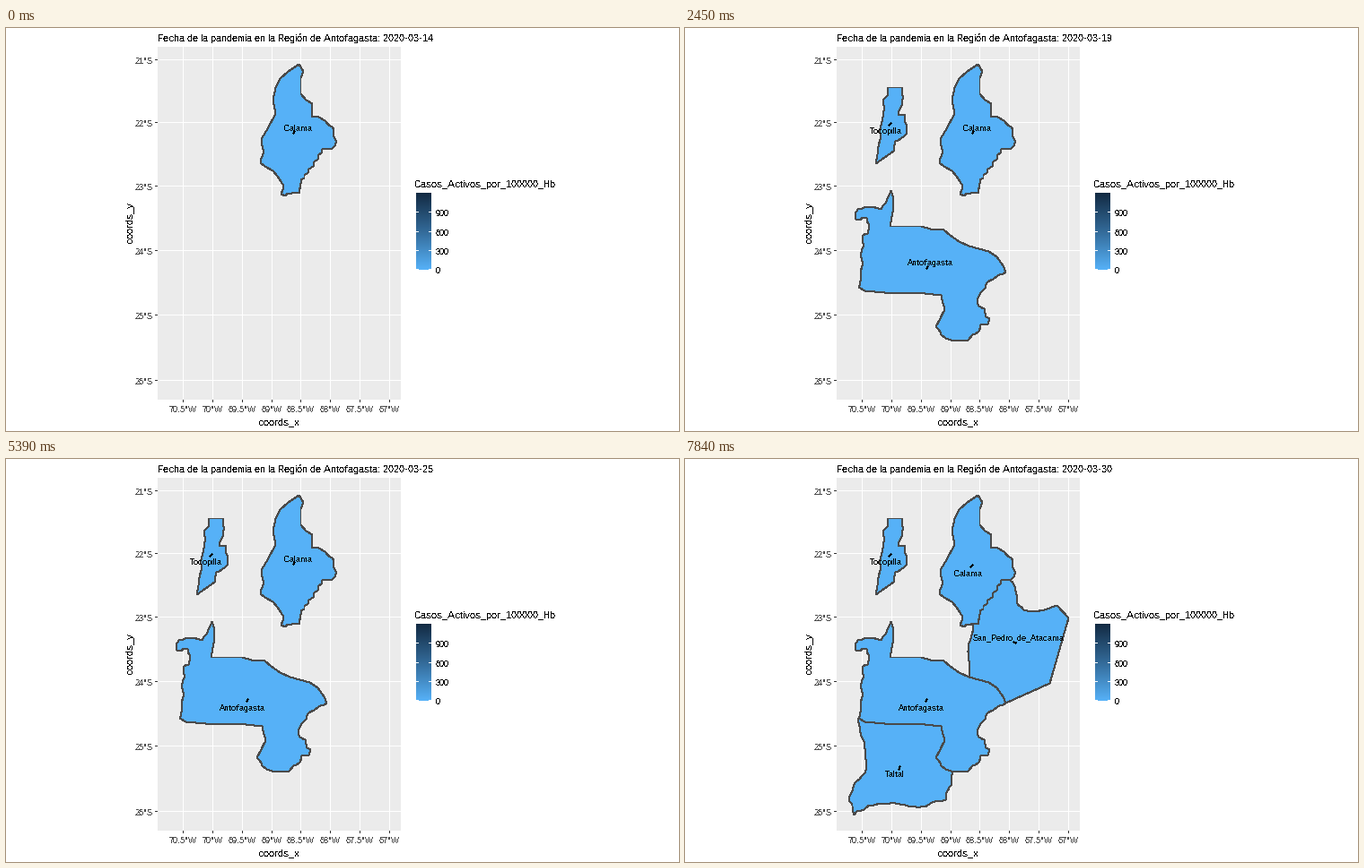
These frames come from a looping animation (750x450 px, 8 s). A matplotlib script:

```python
import math

import matplotlib.pyplot as plt
import numpy as np
from matplotlib.animation import FuncAnimation
from matplotlib.lines import Line2D
from matplotlib.patches import Polygon, Rectangle

W, H, DPI = 750, 450, 100
LOOP, INTERVAL, DAY_MS = 8000, 20, 490
PX = 72 / DPI

# Crisp, hinted, non-antialiased lettering
plt.rcParams.update({
    "font.family": "Liberation Sans",
    "text.hinting": "no_autohint",
    "text.hinting_factor": 1,
    "text.kerning_factor": 6,
    "text.antialiased": False,
})

FILL, EDGE = "#56B1F7", "#4A4A4A"
PANEL, TICK, GREY = "#EBEBEB", "#333333", "#4D4D4D"
LEFT, TOP, RIGHT, BOTTOM = 169, 21, 440, 415

fig = plt.figure(figsize=(W / DPI, H / DPI), dpi=DPI, facecolor="white")
ax = fig.add_axes([0, 0, 1, 1])
ax.axis("off")


def rect(x, y, w, h, color):
    ax.add_patch(Rectangle((x, y), w, h, fc=color, ec="none", lw=0, aa=False))


def text(x, y, s, px, color="black", ha="left", **kw):
    # Round the point size up so that the pixel size is a whole number
    size = math.ceil(px * PX * 64) / 64
    return ax.text(x, y, s, fontsize=size, color=color, ha=ha, va="baseline", **kw)


def rough(points, seed, step=4, amp=0.9):
    """Break a coastline into short, slightly ragged pieces."""
    rng = np.random.default_rng(seed)
    out = [points[0]]
    for (x0, y0), (x1, y1) in zip(points, points[1:]):
        n = max(1, round(math.hypot(x1 - x0, y1 - y0) / step))
        for i in range(1, n):
            dx, dy = rng.uniform(-amp, amp, 2)
            out.append((x0 + (x1 - x0) * i / n + dx, y0 + (y1 - y0) * i / n + dy))
        out.append((x1, y1))
    return out


def region(points):
    patch = Polygon(np.array(points) + 0.5, closed=True, fc=FILL, ec=EDGE,
                    lw=PX, aa=False, joinstyle="round")
    return ax.add_patch(patch)


# Panel, grid and axes
rect(LEFT, TOP, RIGHT - LEFT, BOTTOM - TOP, PANEL)
for i in range(8):
    x = round(197 + i * 32.85)
    rect(x, TOP, 1, BOTTOM - TOP, "white")
    rect(x, BOTTOM, 1, 3, TICK)
    text(x + 0.5, 429, f"{70.5 - i / 2:g}°W", 9, GREY, "center")
for lat, y in zip(range(21, 27), (35, 105, 176, 248, 320, 393)):
    rect(LEFT, y, RIGHT - LEFT, 1, "white")
    rect(LEFT - 3, y, 3, 1, TICK)
    text(164, y + 5, f"{lat}°S", 9, GREY, "right")
text(304.5, 443, "coords_x", 11, ha="center")
text(141, 217.5, "coords_y", 11, ha="center", rotation=90, rotation_mode="anchor")

# Legend
text(456, 178, "Casos_Activos_por_100000_Hb", 11)
stops = np.array([(19, 43, 67), (51, 106, 152), (86, 177, 247)]) / 255
shade = np.linspace(0, 2, 86)
bar = np.stack([np.interp(shade, range(3), stops[:, c]) for c in range(3)], -1)
ax.imshow(bar[:, None, :], extent=(457, 474, 270, 184), aspect="auto",
          interpolation="nearest")
for value, y in zip((900, 600, 300, 0), (205, 227, 248, 269)):
    for x in (457, 471):
        rect(x, y, 3, 1, "white")
    text(479, y + 5, str(value), 9)

# Borders, some of them shared by neighbours
calama_west = [
    (306, 185), (308, 180), (309, 176), (306, 171), (302, 165), (297, 159),
    (288, 154), (283, 150), (284, 145), (287, 138), (284, 128), (285, 122),
    (291, 112), (300, 95), (297, 80), (300, 66), (305, 56), (314, 48),
    (326, 40), (331, 48), (328, 55), (328, 73), (334, 80), (341, 84),
    (340, 98), (348, 99), (355, 103)]
calama_east = rough([
    (355, 103), (363, 110), (365, 113), (365, 121), (367, 125), (366, 131),
    (362, 135)], 1)
calama_south = rough([
    (362, 135), (352, 135), (351, 139), (348, 141), (347, 146), (343, 149),
    (342, 154), (337, 157), (336, 161), (332, 164), (332, 167), (328, 169),
    (327, 183), (319, 183)], 2, amp=0.6)
calama_tip = [(317, 185), (313, 184), (311, 187)]

tocopilla_coast = rough([
    (212, 151), (214, 141), (215, 132), (217, 124), (217, 112), (219, 104),
    (221, 92), (221, 79), (225, 75), (226, 66)], 3, amp=0.6)
tocopilla_east = rough([
    (241, 66), (242, 75), (241, 86), (238, 92), (237, 96), (245, 97),
    (244, 104), (247, 108), (247, 117), (243, 121), (234, 126), (232, 137)],
    4, amp=0.5)

antofagasta_north = [
    (229, 181), (232, 190), (231, 205), (228, 221), (263, 221), (273, 224),
    (288, 225), (295, 231), (305, 238), (316, 243)]
puna = [(316, 243), (338, 249), (347, 255), (354, 265), (357, 272)]
antofagasta_east = rough([
    (357, 272), (350, 275), (343, 280), (336, 284), (334, 290), (329, 295),
    (325, 303), (327, 310), (333, 313), (335, 322), (339, 324), (337, 330),
    (329, 331), (327, 338), (320, 342), (314, 349), (298, 349)], 5)
taltal_east = rough([
    (298, 349), (290, 346), (285, 342), (282, 336), (279, 333), (284, 324),
    (289, 314)], 6, amp=0.5)
taltal_north = [
    (289, 314), (286, 303), (285, 298), (267, 296), (222, 295), (200, 293),
    (193, 289)]
antofagasta_coast = rough([
    (193, 289), (195, 282), (197, 265), (196, 250), (198, 240), (197, 232),
    (203, 229), (205, 220), (202, 212), (197, 211), (195, 214), (190, 213),
    (189, 207), (192, 202), (205, 199), (218, 202), (224, 193), (229, 181)], 7)

taltal_coast = rough([
    (193, 289), (194, 303), (200, 317), (200, 330), (202, 338), (200, 350),
    (194, 357), (188, 363), (186, 370), (183, 376), (182, 381), (186, 386),
    (188, 397), (191, 393), (199, 391), (205, 386), (218, 385), (234, 384),
    (245, 386), (260, 389), (267, 388), (278, 382), (290, 380), (291, 372),
    (297, 363), (296, 358), (298, 349)], 8)
pedro_west = rough([
    (319, 183), (321, 187), (318, 200), (315, 207), (316, 225), (317, 234),
    (316, 243)], 9, amp=0.5)
pedro_north = rough([
    (362, 135), (366, 140), (369, 151), (369, 160), (377, 168), (389, 170)],
    10, amp=0.6)
pedro_east = [(400, 168), (414, 163), (427, 177), (406, 250), (357, 272)]

shapes = {
    "Calama": calama_west + calama_east + calama_south + calama_tip,
    "Tocopilla": tocopilla_coast + tocopilla_east,
    "Antofagasta": (antofagasta_north + puna + antofagasta_east + taltal_east
                    + taltal_north + antofagasta_coast),
    "San_Pedro_de_Atacama": (pedro_north + pedro_east + puna[::-1]
                             + pedro_west[::-1] + calama_south[::-1]),
    "Taltal": taltal_coast + taltal_east + taltal_north,
}

# One letter per day; each spot is (text x, baseline) and the pointer's ends
tracks = {
    "Calama": ("udueuuduuduuduude", {
        "u": ((309, 115), (321, 115), (320, 117)),
        "d": ((298, 131), (320, 118), (318, 120)),
        "e": ((299, 131), (320, 118), (318, 120))}),
    "Tocopilla": ("-----dmmdudmuduud", {
        "u": ((216, 103), (230, 104), (229, 106)),
        "d": ((206, 118), (229, 106), (227, 108)),
        "m": ((205, 118), (229, 106), (227, 108))}),
    "Antofagasta": ("-----uududududuud", {
        "u": ((248, 265), (270, 266), (269, 268)),
        "d": ((238, 281), (269, 268), (268, 270))}),
    "San_Pedro_de_Atacama": ("-" * 16 + "u", {
        "u": ((321, 202), (366, 204), (368, 205))}),
    "Taltal": ("-" * 16 + "u", {
        "u": ((223, 355), (239, 343), (238, 346))}),
}

areas = {name: region(points) for name, points in shapes.items()}
labels = {name: text(0, 0, name, 9) for name in tracks}
marks = {name: ax.add_line(Line2D([], [], color="black", lw=PX, aa=False))
         for name in tracks}
title = text(169, 15, "", 11)

ax.set_xlim(0, W)
ax.set_ylim(H, 0)


def draw(i):
    day = min((i * INTERVAL + INTERVAL // 2) // DAY_MS, 16)
    title.set_text("Fecha de la pandemia en la Región de Antofagasta: "
                   f"2020-03-{14 + day}")
    for name, (track, spots) in tracks.items():
        spot = spots.get(track[day])
        for artist in (areas[name], labels[name], marks[name]):
            artist.set_visible(spot is not None)
        if spot:
            place, a, b = spot
            labels[name].set_position(place)
            marks[name].set_data((a[0] + 0.5, b[0] + 0.5), (a[1] + 0.5, b[1] + 0.5))


anim = FuncAnimation(fig, draw, frames=LOOP // INTERVAL, interval=INTERVAL,
                     repeat=True, repeat_delay=0, blit=False)
plt.show()
```
